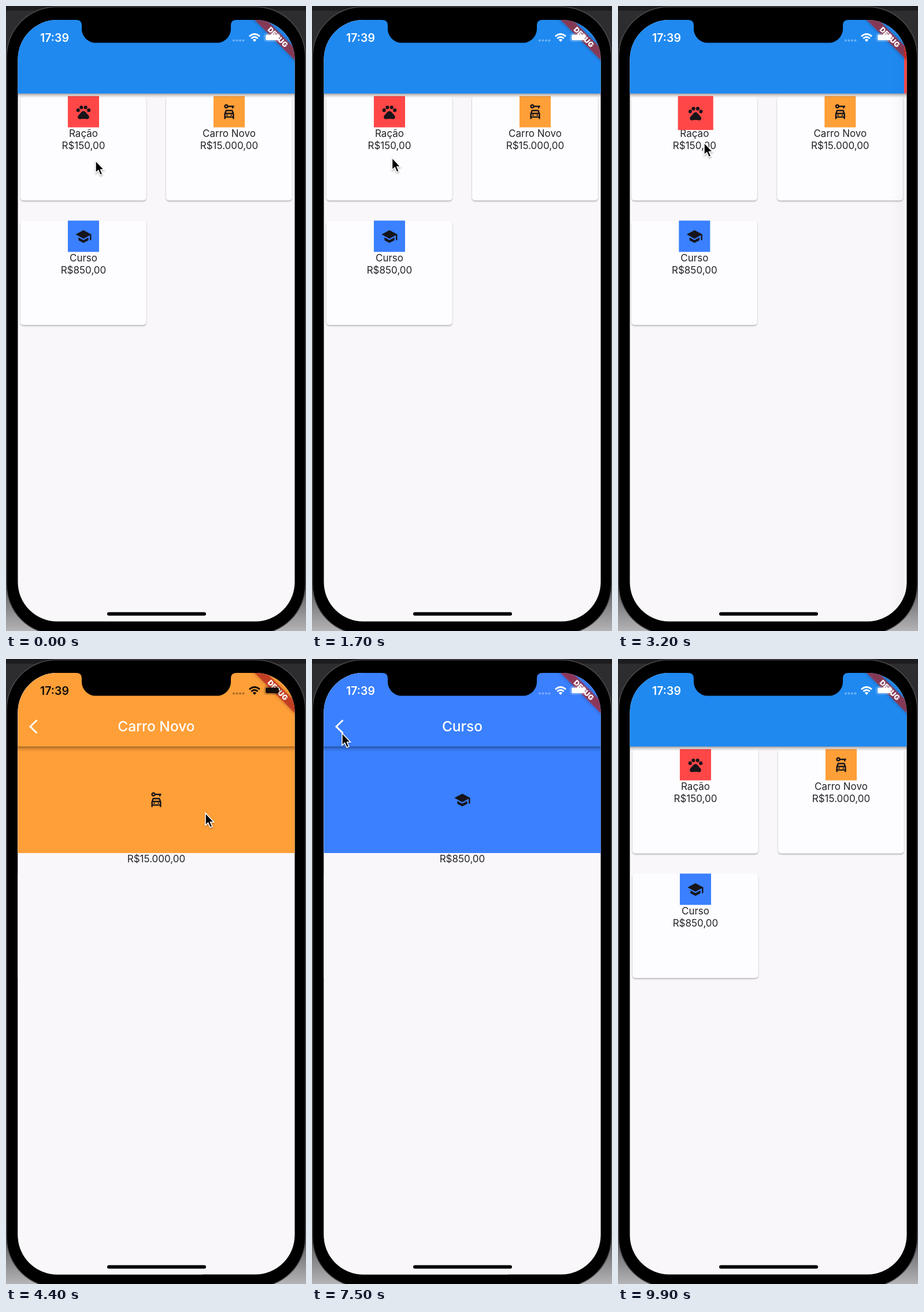
Recreate the animation shown at these times as an HTML page. Size 519 by 1079 pixels, loop 10000 ms.

```html
<!DOCTYPE html>
<html lang="pt">
<head>
<meta charset="utf-8">
<title>Despesas</title>
<style>
  html, body { margin: 0; width: 100%; height: 100%; overflow: hidden; background: #000; }
  svg { display: block; width: 519px; height: 1079px; }
  text { font-family: Inter, Roboto, sans-serif; }
  .body { font-size: 17px; fill: #242326; text-anchor: middle; }
  .title { font-size: 24.5px; font-weight: 500; fill: #fff; text-anchor: middle; }
</style>
</head>
<body>
<svg viewBox="0 0 519 1079" xmlns="http://www.w3.org/2000/svg">
  <defs>
    <clipPath id="screen"><rect x="20.5" y="24" width="479" height="1038.5" rx="68"/></clipPath>
    <linearGradient id="back" x1="0" y1="0" x2="0" y2="1">
      <stop offset="0" stop-color="#2d2c2f"/><stop offset=".9" stop-color="#2d2c2f"/>
      <stop offset=".95" stop-color="#77777a"/><stop offset="1" stop-color="#b4b4b6"/>
    </linearGradient>
    <linearGradient id="drop" x1="0" y1="0" x2="0" y2="1">
      <stop offset="0" stop-color="#000" stop-opacity=".36"/>
      <stop offset=".45" stop-color="#000" stop-opacity=".13"/>
      <stop offset="1" stop-color="#000" stop-opacity="0"/>
    </linearGradient>
    <linearGradient id="edge">
      <stop offset="0" stop-color="#000" stop-opacity="0"/>
      <stop offset="1" stop-color="#000" stop-opacity=".03"/>
    </linearGradient>
    <filter id="lift" x="-10%" y="-10%" width="120%" height="120%">
      <feDropShadow dx="0" dy="1.6" stdDeviation="1.2" flood-color="#000" flood-opacity=".34"/>
    </filter>
    <filter id="glow" x="-20%" y="-80%" width="140%" height="260%">
      <feDropShadow dx="0" dy="0" stdDeviation="3" flood-color="#000" flood-opacity=".45"/>
    </filter>
    <filter id="soft" x="-50%" y="-50%" width="200%" height="200%">
      <feDropShadow dx="0" dy="1.5" stdDeviation="1.3" flood-color="#000" flood-opacity=".4"/>
    </filter>
    <g id="pets">
      <circle cx="4.5" cy="9.5" r="2.5"/><circle cx="9" cy="5.5" r="2.5"/>
      <circle cx="15" cy="5.5" r="2.5"/><circle cx="19.5" cy="9.5" r="2.5"/>
      <path d="M17.3 14.9L14.9 12Q13.700 10.500 12 10.500T9.100 12L6.700 14.900C5.400 16.200 3.700 17.600 4 19.700C4.300 20.700 5.100 21.700 6.400 22C7.100 22.100 9.400 21.500 12 21.500S16.900 22.100 17.600 22C18.900 21.700 19.700 20.700 20 19.700C20.300 17.600 18.600 16.200 17.300 14.900Z"/>
    </g>
    <g id="car" fill-rule="evenodd">
      <path d="M10.800 3A3 3 0 1 0 10.800 5H16V7H18V5H19V3ZM8 5A1 1 0 1 1 8 3A1 1 0 0 1 8 5Z"/>
      <path d="M17.400 10Q17.100 9 16.300 9H7.700Q6.900 9 6.600 10L5 14.700V21.200Q5 22 5.800 22H6.200Q7 22 7 21.200V20H17V21.200Q17 22 17.800 22H18.200Q19 22 19 21.200V14.700ZM8.300 11H15.700L16.300 13H7.700ZM17 18H7V15H17Z"/>
      <circle cx="9" cy="16.500" r="1"/><circle cx="15" cy="16.500" r="1"/>
    </g>
    <path id="school" d="M5 13.200V17.200L12 21L19 17.200V13.200L12 17ZM12 3L1 9L12 15L21 10.100V17H23V9Z"/>
  </defs>

  <rect width="519" height="1079" fill="url(#back)"/>
  <rect width="519" height="8" fill="#1d1c1f"/>
  <rect x="1" y="1.500" width="517" height="1083" rx="86" fill="#000" stroke="#4b4a4d" stroke-width="1.500"/>

  <g clip-path="url(#screen)">
    <g id="home">
      <rect x="20" y="24" width="480" height="1039" fill="#f9f7fa"/>
      <g id="cards"></g>
      <rect x="20" y="151" width="480" height="8" fill="url(#drop)"/>
      <rect x="20" y="24" width="480" height="127" fill="#1f89f0"/>
    </g>
    <g id="detail">
      <rect x="-4" y="24" width="24" height="1039" fill="url(#edge)"/>
      <rect x="20" y="24" width="480" height="1039" fill="#f9f7fa"/>
      <g id="rest"></g>
      <rect x="20" y="151" width="480" height="9" fill="url(#drop)"/>
      <rect id="bar" x="20" y="24" width="480" height="127"/>
      <path d="M53.500 105.500L42 116.700L53.500 128" fill="none" stroke="#fff" stroke-width="3"/>
      <text id="title" class="title" x="260" y="125"></text>
      <text id="price" class="body" x="260" y="351"></text>
    </g>
    <g id="fly"></g>
    <rect x="175" y="1046.500" width="171" height="6" rx="3" fill="#000"/>
    <g transform="translate(470.200 53.800) rotate(45)">
      <rect x="-60" y="-7.400" width="120" height="14.800" fill="#b71c1c" fill-opacity=".63" filter="url(#glow)"/>
      <text y="4.500" text-anchor="middle" font-size="12.500" font-weight="900" fill="#fff">DEBUG</text>
    </g>
    <g id="status">
      <text x="59" y="62" font-size="19.500" font-weight="600">17:39</text>
      <g opacity=".35">
        <circle cx="394" cy="59.500" r="2"/><circle cx="399.500" cy="59.500" r="2"/>
        <circle cx="405" cy="59.500" r="2"/><circle cx="410.500" cy="59.500" r="2"/>
      </g>
      <g fill="none" stroke="currentColor" stroke-width="2.900">
        <path d="M421 52.300Q430 44.500 439 52.300"/>
        <path d="M424.300 56Q430 51 435.700 56"/>
      </g>
      <path d="M426.800 58.500Q430 55.700 433.200 58.500L430 62Z"/>
      <rect x="447" y="47.500" width="27" height="13.500" rx="4" fill="none" stroke="currentColor" stroke-opacity=".4" stroke-width="1.200"/>
      <rect x="449" y="49.300" width="23" height="10" rx="2.300"/>
      <path d="M475.600 52.200Q478 54.200 475.600 56.300Z" opacity=".45"/>
    </g>
  </g>
  <path d="M121 23H399V24Q389 24 389 33V39A24 24 0 0 1 365 63.500H155A24 24 0 0 1 131 39V33Q131 24 121 24Z" fill="#000"/>
  <path id="cursor" d="M0 0V21L4.700 16.800L8.200 24.700L11.900 23.100L8.500 15.400H14.600Z" fill="#000" stroke="#fff" stroke-width="1.500" filter="url(#soft)"/>
</svg>
<script>
const LOOP = 10000, SLIDE = 400;
const $ = id => document.getElementById(id);

const items = [
  { name: 'Ração', price: 'R$150,00', icon: 'pets', color: '#ff4747', x: 25, y: 155.5, open: 1900, close: 2872 },
  { name: 'Carro Novo', price: 'R$15.000,00', icon: 'car', color: '#ff9f38', x: 277, y: 155.5, open: 3850, close: 5550, dark: true },
  { name: 'Curso', price: 'R$850,00', icon: 'school', color: '#3a80ff', x: 25, y: 370.5, open: 6180, close: 7570 }
];

// Pointer path: time, x, y
const path = [
  [0, 155, 267], [900, 150, 266], [1700, 138.500, 262], [2000, 138, 262], [2550, 50, 120],
  [2900, 51, 122], [3200, 149, 236], [3700, 345, 266], [4600, 345, 266], [5250, 50, 120],
  [5580, 51, 122], [5960, 181, 418], [6400, 181, 418], [7050, 52, 128], [7650, 52, 128],
  [8300, 120, 250], [8700, 120, 255], [9500, -40, 300], [LOOP, -40, 300]
];

const clamp = v => Math.max(0, Math.min(1, v));
const mix = (a, b, k) => a + (b - a) * k;

function bezier(x1, y1, x2, y2) {
  const at = (a, b, s) => 3 * (1 - s) * (1 - s) * s * a + 3 * (1 - s) * s * s * b + s * s * s;
  return x => {
    if (x <= 0 || x >= 1) return clamp(x);
    let lo = 0, hi = 1;
    for (let i = 0; i < 24; i++) {
      const mid = (lo + hi) / 2;
      if (at(x1, x2, mid) < x) lo = mid; else hi = mid;
    }
    return at(y1, y2, lo);
  };
}
const slideEase = bezier(.35, .91, .33, .97);
const heroEase = bezier(.4, 0, .2, 1);

const iconAt = (it, x, y) =>
  `<use href="#${it.icon}" fill="#17151a" transform="translate(${x} ${y}) scale(1.23) translate(-12 -12)"/>`;

function heroBox(it, [l, t, r, b]) {
  return `<rect x="${l}" y="${t}" width="${r - l}" height="${b - t}" fill="${it.color}"/>` +
    iconAt(it, (l + r) / 2, (t + b) / 2 + .5);
}

const label = (x, y, s) => `<text class="body" x="${x}" y="${y}">${s}</text>`;
const cardBox = (it, shift = 0) => {
  const l = it.x + 82 + shift;
  return [l, it.y, l + 54, it.y + 54];
};
const fullBox = [20, 151, 500, 335];

$('cards').innerHTML = items.map(it => {
  const cx = it.x + 109;
  return `<rect x="${it.x}" y="${it.y}" width="217.500" height="180" rx="5" fill="#fdfcfe" filter="url(#lift)"/>` +
    `<g class="hero">${heroBox(it, cardBox(it))}</g>` +
    label(cx, it.y + 70.5, it.name) + label(cx, it.y + 91.5, it.price);
}).join('');
const heroes = [...document.querySelectorAll('.hero')];

// Circular arc that leaves along the longer axis
function arc(ax, ay, bx, by, k) {
  const dx = bx - ax, dy = by - ay, w = Math.abs(dx), h = Math.abs(dy);
  if (w < 2 || h < 2) return [mix(ax, bx, k), mix(ay, by, k)];
  const d2 = w * w + h * h;
  if (w > h) {
    const r = d2 / h / 2, a = Math.asin(w / r) * k;
    return [ax + Math.sign(dx) * r * Math.sin(a), ay + Math.sign(dy) * r * (1 - Math.cos(a))];
  }
  const r = d2 / w / 2, a = Math.asin(h / r) * (1 - k);
  return [bx - Math.sign(dx) * r * (1 - Math.cos(a)), by - Math.sign(dy) * r * Math.sin(a)];
}

function flight(a, b, k) {
  const right = b[0] + b[2] > a[0] + a[2], down = b[1] + b[3] > a[1] + a[3];
  const hx = right ? 2 : 0, hy = down ? 3 : 1, tx = 2 - hx, ty = 4 - hy;
  const head = arc(a[hx], a[hy], b[hx], b[hy], k);
  const tail = arc(a[tx], a[ty], b[tx], b[ty], k);
  return [Math.min(head[0], tail[0]), Math.min(head[1], tail[1]),
    Math.max(head[0], tail[0]), Math.max(head[1], tail[1])];
}

function pointer(t) {
  let i = 0;
  while (i < path.length - 2 && t >= path[i + 1][0]) i++;
  const [t0, x0, y0] = path[i], [t1, x1, y1] = path[i + 1];
  const u = clamp((t - t0) / (t1 - t0)), k = u * u * (3 - 2 * u);
  return [mix(x0, x1, k), mix(y0, y1, k)];
}

let shown = -1;
function fill(n) {
  if (n === shown) return;
  shown = n;
  const it = items[n];
  $('bar').setAttribute('fill', it.color);
  $('title').textContent = it.name;
  $('price').textContent = it.price;
  $('rest').innerHTML = heroBox(it, fullBox);
}

function draw(t) {
  const n = items.findIndex(it => t >= it.open && t < it.close + SLIDE);
  const it = items[n];
  let k = 0, box = null;
  if (it) {
    fill(n);
    const closing = t >= it.close;
    const u = clamp((t - (closing ? it.close : it.open)) / SLIDE);
    k = closing ? 1 - slideEase(u) : slideEase(u);
    if (closing) box = flight(fullBox, cardBox(it, -160 * k), heroEase(u));
    else if (u < 1) box = flight(cardBox(it), fullBox, heroEase(u));
  }
  $('home').setAttribute('transform', `translate(${-160 * k} 0)`);
  $('detail').setAttribute('transform', `translate(${480 * (1 - k)} 0)`);
  $('detail').style.display = it ? '' : 'none';
  $('rest').style.display = box ? 'none' : '';
  $('fly').innerHTML = box ? heroBox(it, box) : '';
  heroes.forEach((h, i) => { h.style.display = i === n ? 'none' : ''; });

  const ink = it && it.dark && k > .5 ? '#120d08' : '#fff';
  $('status').setAttribute('fill', ink);
  $('status').setAttribute('color', ink);
  const [x, y] = pointer(t);
  $('cursor').setAttribute('transform', `translate(${x} ${y})`);
}

const start = performance.now();
function tick() {
  draw((performance.now() - start) % LOOP);
  requestAnimationFrame(tick);
}
draw(0);
tick();
</script>
</body>
</html>
```
